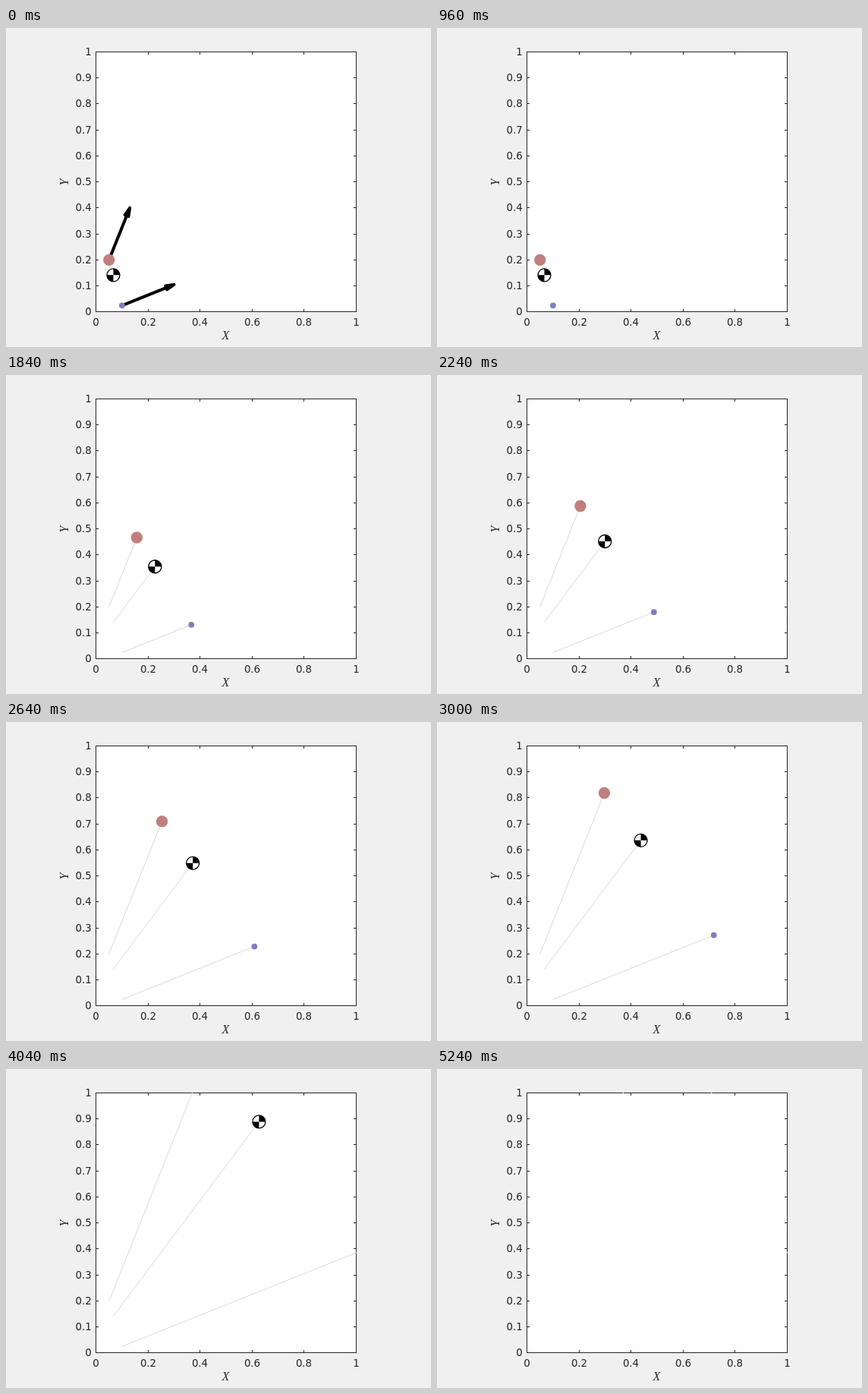
Write an HTML page that moves like this. It is 560 by 420 pixels and loops after 5.28 s.

```html
<!DOCTYPE html>
<html lang="en">
<head>
<meta charset="utf-8">
<title>Centre of mass</title>
<style>
  html, body { margin: 0; width: 100%; height: 100%; overflow: hidden; background: #f0f0f0; }
  svg { display: block; width: 560px; height: 420px; }
  text { font: 13.33px "DejaVu Sans", sans-serif; fill: #262626; }
  .name { font: italic 16px "Liberation Serif", serif; text-anchor: middle; }
  #axes { fill: none; stroke: #262626; shape-rendering: crispEdges; }
  #trails { stroke-width: 1; }
  #arrows { fill: none; stroke: #000; stroke-width: 4; stroke-linecap: round; stroke-linejoin: round; }
</style>
</head>
<body>
<svg viewBox="0 0 560 420">
  <defs>
    <clipPath id="plot"><rect x="118" y="31" width="344" height="343"/></clipPath>
  </defs>
  <rect width="560" height="420" fill="#f0f0f0"/>
  <rect x="118" y="31" width="344" height="343" fill="#fff"/>
  <path id="axes"/>
  <g id="labels"></g>
  <text class="name" x="289.5" y="410">X</text>
  <text class="name" transform="translate(82 203) rotate(-90)">Y</text>
  <g id="trails" clip-path="url(#plot)"></g>
  <g id="arrows"></g>
  <circle id="red" r="7.7" fill="#c07f7f"/>
  <circle id="blue" r="3.9" fill="#7f7fc0"/>
  <g clip-path="url(#plot)">
    <g id="mass">
      <circle r="8.5" fill="#fff" stroke="#000" stroke-width="1.3"/>
      <path d="M0 0V-8.5A8.5 8.5 0 0 1 8.5 0ZM0 0V8.5A8.5 8.5 0 0 1 -8.5 0Z"/>
    </g>
  </g>
</svg>
<script>
const LOOP = 5280, STEP = 40, HOLD = 960, LAST = 99;
const byId = id => document.getElementById(id);
const px = x => 118.6 + 342.7 * x;
const py = y => 373.9 - 342.7 * y;

function add(parent, tag, attrs, text = '') {
  const el = document.createElementNS('http://www.w3.org/2000/svg', tag);
  for (const key in attrs) el.setAttribute(key, attrs[key]);
  el.textContent = text;
  return byId(parent).appendChild(el);
}

// Frame, ticks and tick labels
let axes = 'M118.5 31.5H461.5V373.5H118.5Z';
for (let i = 0; i <= 10; i++) {
  const x = Math.floor(px(i / 10)) + 0.5;
  const y = Math.floor(py(i / 10)) + 0.5;
  const label = String(i / 10);
  axes += `M118 ${y}h4M462 ${y}h-4`;
  add('labels', 'text', { x: 112.7, y: y + 4.8, 'text-anchor': 'end' }, label);
  if (i % 2 === 0) {
    axes += `M${x} 31v4M${x} 374v-4`;
    add('labels', 'text', { x, y: 392, 'text-anchor': 'middle' }, label);
  }
}
byId('axes').setAttribute('d', axes);

// Position and velocity in axis units; the third body is the mass centre (2:1)
const red = { x: 0.05, y: 0.2, u: 0.08, v: 0.2, el: byId('red') };
const blue = { x: 0.1, y: 0.025, u: 0.2, v: 0.08, el: byId('blue') };
const mass = { el: byId('mass'), clipped: true };
for (const key of ['x', 'y', 'u', 'v']) mass[key] = (2 * red[key] + blue[key]) / 3;
const bodies = [red, blue, mass];

for (const b of bodies) {
  b.trail = add('trails', 'line', { x1: px(b.x), y1: py(b.y) });
}

for (const b of [red, blue]) {
  const dx = 342.7 * b.u, dy = -342.7 * b.v;
  const angle = Math.atan2(dy, dx) * 180 / Math.PI;
  const len = Math.hypot(dx, dy);
  add('arrows', 'path', {
    d: `M0 0H${len}M${len - 11} -2.6L${len} 0L${len - 11} 2.6`,
    transform: `translate(${px(b.x)} ${py(b.y)}) rotate(${angle})`
  });
}

function trailColor(t) {
  const fade = t < 5080 ? 0 : t < 5160 ? 0.4 : t < 5240 ? 0.7 : 1;
  const level = Math.round(217 + 38 * fade);
  return `rgb(${level},${level},${level})`;
}

function draw(t) {
  const k = Math.min(LAST, Math.max(0, Math.floor((t - HOLD) / STEP)));
  const s = k * 6 / LAST;
  byId('arrows').style.display = t < HOLD ? '' : 'none';
  byId('trails').style.stroke = trailColor(t);
  byId('trails').style.display = k ? '' : 'none';
  for (const b of bodies) {
    const x = b.x + b.u * s, y = b.y + b.v * s;
    const inside = Math.max(x, y) <= 1 + 1e-9;
    b.trail.setAttribute('x2', px(x));
    b.trail.setAttribute('y2', py(y));
    b.el.setAttribute('transform', `translate(${px(x)} ${py(y)})`);
    b.el.style.display = b.clipped || inside ? '' : 'none';
  }
}

function tick() {
  draw(performance.now() % LOOP);
  requestAnimationFrame(tick);
}
tick();
</script>
</body>
</html>
```
